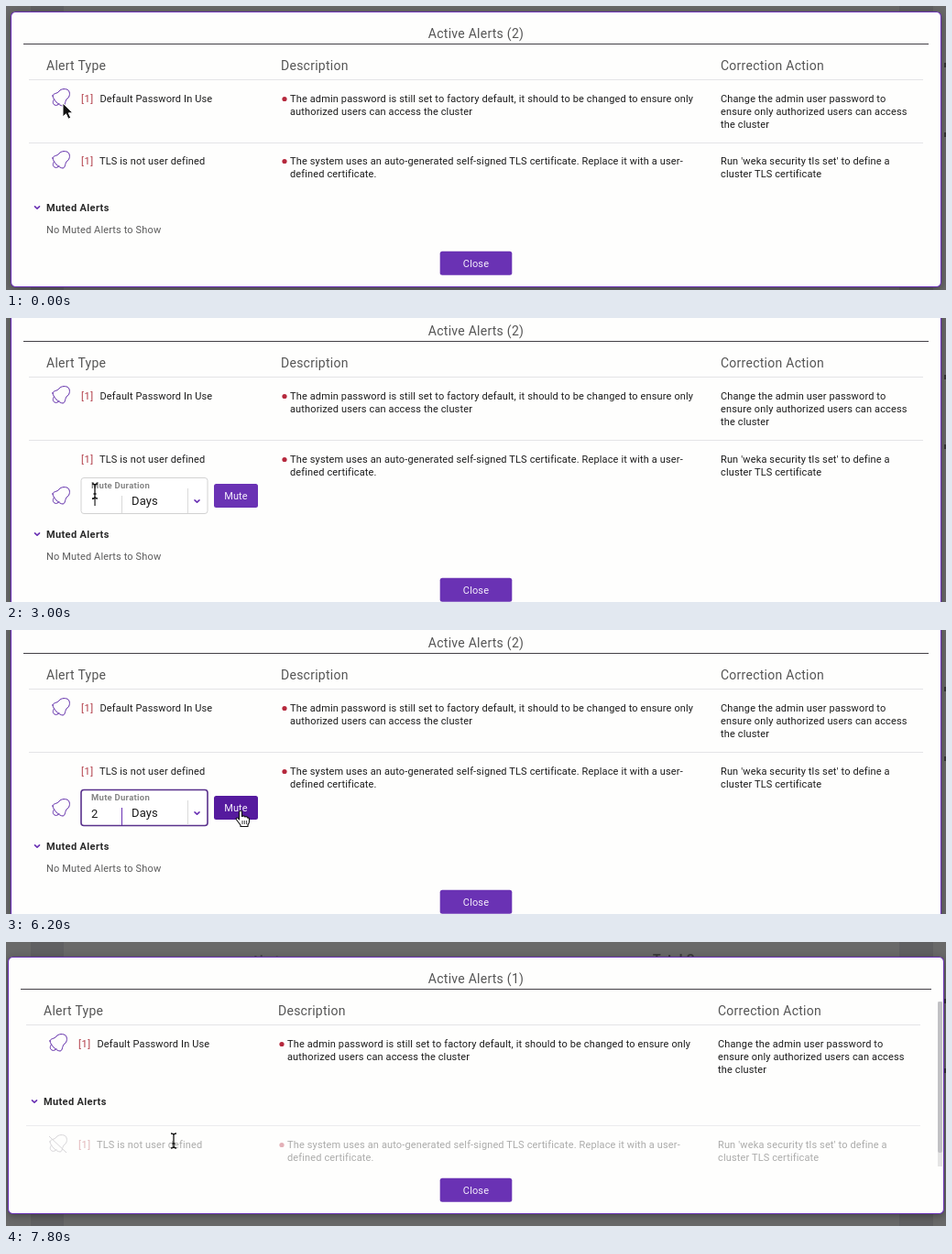
These frames come from a looping animation (1026x310 px, 8 s). An HTML page:

```html
<!DOCTYPE html>
<html lang="en">
<head>
<meta charset="utf-8">
<title>Active Alerts</title>
<style>
html, body { margin: 0; width: 100%; height: 100%; overflow: hidden; background: #696969; }
svg { display: block; width: 1026px; height: 310px; }
text { font: 11px Roboto, "Noto Sans", sans-serif; letter-spacing: .135px; fill: #1c1c1c; white-space: pre; }
.big { font-size: 14px; letter-spacing: .26px; fill: #555; }
.mid { text-anchor: middle; }
.bold { font-weight: 600; letter-spacing: .36px; fill: #2a2a2a; }
.soft { fill: #5c5c5c; }
.red { fill: #b03a46; letter-spacing: .6px; }
.white { fill: #f5effc; }
.label { font-size: 9.5px; font-weight: 600; letter-spacing: .25px; fill: #858585; }
.value { font-size: 13px; letter-spacing: .15px; }
.purple { fill: #6a32b4; }
.sep { fill: #e4e4e7; }
.line { fill: none; stroke: #6a32b4; stroke-linecap: round; stroke-linejoin: round; }
.dot { fill: #b5283c; }

/* One step is 200 ms, or 2.5% of the loop. */
svg * { animation: 8s step-end infinite; }

.panel { animation-name: panel; }
@keyframes panel {
  0%, 92.5% { x: 5.5px; width: 1015px; y: 6.5px; height: 300px; }
  25% { x: 5.5px; width: 1015px; y: 1.5px; height: 310px; }
  27.5% { x: 5.5px; width: 1015px; y: -9.5px; height: 332px; }
  90% { x: 5.5px; width: 1015px; y: -1.5px; height: 315px; }
  95% { x: 2.5px; width: 1021px; y: 16.5px; height: 280px; }
}
.rule { animation-name: rule; }
@keyframes rule {
  0%, 27.5%, 92.5% { x: 19px; width: 988px; fill: #434046; }
  25%, 90% { x: 19px; width: 988px; fill: #6a32b4; }
  95% { x: 16px; width: 994px; fill: #434046; }
}
.up { animation-name: up; }
@keyframes up {
  0%, 92.5% { transform: none; }
  25% { transform: translateY(-5px); }
  27.5% { transform: translateY(-16px); }
  90% { transform: translateY(-7px); }
  95% { transform: translateY(10px); }
}
.row { animation-name: row; }
@keyframes row {
  0%, 92.5% { transform: none; }
  25% { transform: translateY(-4px); }
  27.5% { transform: translateY(-15px); }
  90% { transform: translateY(-6px); }
}
.bell { animation-name: bell; }
@keyframes bell {
  0%, 92.5% { transform: none; }
  25% { transform: translateY(-3px); }
  27.5% { transform: translateY(26px); }
  90% { transform: translateY(-4px); }
}
.down { animation-name: down; }
@keyframes down {
  0%, 92.5% { transform: none; }
  25% { transform: translateY(4.5px); }
  27.5% { transform: translateY(16px); }
  90% { transform: translateY(7px); }
  95% { transform: translateY(-10px); }
}
.left { animation-name: left; }
@keyframes left { 0% { transform: none; } 95% { transform: translateX(-3px); } }
.heading { animation-name: heading; }
@keyframes heading { 0% { transform: none; } 95% { transform: translate(-3px, -36px); } }

.active { animation-name: active; }
@keyframes active { 0% { visibility: visible; } 95% { visibility: hidden; } }
.muted { animation-name: muted; }
@keyframes muted { 0% { visibility: hidden; } 95% { visibility: visible; } }
.hover { animation-name: hover; }
@keyframes hover { 0%, 27.5% { visibility: hidden; } 12.5% { visibility: visible; } }
.tip { animation-name: tip; }
@keyframes tip { 0%, 27.5% { visibility: hidden; } 15% { visibility: visible; } }
.form { animation-name: form; }
@keyframes form { 0%, 90% { visibility: hidden; } 27.5% { visibility: visible; } }
.before { animation-name: before; }
@keyframes before { 0%, 57.5% { visibility: hidden; } 27.5% { visibility: visible; } }
.after { animation-name: after; }
@keyframes after { 0%, 90% { visibility: hidden; } 57.5% { visibility: visible; } }
.caret { animation-name: caret; }
@keyframes caret {
  0%, 47.5%, 72.5% { visibility: hidden; }
  42.5%, 52.5% { visibility: visible; }
}
.field { animation-name: field; }
@keyframes field {
  0% { stroke: #d2d2d2; stroke-width: 1px; }
  42.5% { stroke: #59318c; stroke-width: 1.6px; }
}
.split { animation-name: split; }
@keyframes split { 0% { fill: #d8d8d8; } 42.5% { fill: #6a32b4; } }
.mute { animation-name: mute; }
@keyframes mute { 0% { fill: #6a32b4; } 75% { fill: #551a9e; } }

.pointer { animation-name: pointer; }
@keyframes pointer {
  0% { transform: translate(62px, 106px); }
  5% { transform: translate(62px, 109px); }
  7.5% { transform: translate(62px, 118px); }
  10% { transform: translate(61px, 136px); }
  12.5% { transform: translate(60px, 156px); }
  15% { transform: translate(60px, 165px); }
  17.5% { transform: translate(60px, 167px); }
  30% { transform: translate(66px, 176px); }
  32.5% { transform: translate(86px, 186px); }
  35% { transform: translate(97px, 189px); }
  72.5% { transform: translate(165px, 193px); }
  75% { transform: translate(242px, 194px); }
  77.5% { transform: translate(256px, 195px); }
  92.5% { transform: translate(252px, 198px); }
  95% { transform: translate(212px, 209px); }
  97.5% { transform: translate(183px, 217px); }
}
.arrow { animation-name: arrow; }
@keyframes arrow {
  0%, 30%, 72.5%, 90% { visibility: visible; }
  12.5%, 32.5%, 75%, 97.5% { visibility: hidden; }
}
.hand { animation-name: hand; }
@keyframes hand {
  0%, 30%, 90% { visibility: hidden; }
  12.5%, 75% { visibility: visible; }
}
.beam { animation-name: beam; }
@keyframes beam {
  0%, 55%, 72.5% { visibility: hidden; }
  32.5%, 70%, 97.5% { visibility: visible; }
}
</style>
</head>
<body>
<svg viewBox="0 0 1026 310">
  <defs>
    <g id="bell" fill="none" stroke-linecap="round" stroke-linejoin="round">
      <path d="M-9-2C-9-5-4-4-2-7C0-10 6-10 8-8C10-6 10-1 7 1C4 3 5 9 2 9C-2 9-9 2-9-2Z"/>
      <path d="M-7.500 2C-9.500 4-9 7-7 8C-5 9-3 8-2 6.500"/>
    </g>
    <g id="tls">
      <text class="red" x="82" y="173">[1]</text>
      <text x="102" y="173">TLS is not user defined</text>
      <circle class="dot" cx="304" cy="169.5" r="2.6"/>
      <text x="310" y="173">The system uses an auto-generated self-signed TLS certificate. Replace it with a user-</text>
      <text x="310" y="187">defined certificate.</text>
      <text x="780" y="173">Run 'weka security tls set' to define a</text>
      <text x="780" y="187">cluster TLS certificate</text>
    </g>
    <path id="chevron" class="line" stroke-width="1.6" d="M-2.5-1.2L0 1.2L2.5-1.2"/>
  </defs>

  <!-- Dimmed page behind the dialog -->
  <rect width="1026" height="310" fill="#696969"/>
  <path fill="#606062" d="M27 0h36v310h-36zM975 0h37v310h-37z"/>
  <text class="bold" x="268" y="24" style="font-size:13px;fill:#484848">Alerts</text>
  <text class="bold" x="706" y="24" style="font-size:14px;fill:#3c3c3c">Total S</text>
  <path fill="#333" d="M1024 62h2v5h-2zM1024 138h2v5h-2z"/>

  <rect class="panel" rx="5" fill="#fefefd" stroke="#6a32b4" stroke-width="1.1" style="filter:drop-shadow(0 2px 4px #0005)"/>

  <g class="up">
    <text class="big mid active" x="513" y="35">Active Alerts (2)</text>
    <text class="big mid muted" x="513" y="35">Active Alerts (1)</text>
    <rect class="rule" y="41" height="1"/>
    <g class="left">
      <text class="big" x="44" y="70">Alert Type</text>
      <text class="big" x="300" y="70">Description</text>
      <text class="big" x="780" y="70">Correction Action</text>
      <rect class="sep" x="25" y="80" width="976" height="1"/>
      <use href="#bell" x="60" y="100" stroke="#5f2ba8"/>
      <text class="red" x="82" y="105">[1]</text>
      <text x="102.500" y="105">Default Password In Use</text>
      <circle class="dot" cx="304" cy="101.5" r="2.6"/>
      <text x="310" y="105">The admin password is still set to factory default, it should to be changed to ensure only</text>
      <text x="310" y="119">authorized users can access the cluster</text>
      <text x="780" y="105">Change the admin user password to</text>
      <text x="780" y="119">ensure only authorized users can access</text>
      <text x="780" y="133">the cluster</text>
      <rect class="sep active" x="25" y="149" width="976" height="1"/>
    </g>
  </g>

  <g class="active">
    <g class="row"><use href="#tls"/></g>
    <g class="bell">
      <circle class="hover" cx="60" cy="168" r="15.5" fill="#dcdcdf"/>
      <use href="#bell" x="60" y="168" stroke="#5f2ba8"/>
      <g class="tip">
        <path d="M36 116h47q3 0 3 3v23q0 3-3 3h-18l-5.500 6l-5.500-6h-18q-3 0-3-3v-23q0-3 3-3z" fill="#f1f8fc" stroke="#d3dee5" style="filter:drop-shadow(0 1px 1px #0002)"/>
        <text class="mid" x="59.500" y="134">Mute</text>
      </g>
    </g>
  </g>

  <g class="form">
    <rect class="field" x="82" y="174.500" width="138" height="39" rx="3" fill="#fff"/>
    <text class="label" x="93" y="186">Mute Duration</text>
    <text class="value before" x="93" y="205">1</text>
    <text class="value after" x="93" y="205">2</text>
    <rect class="caret" x="100.500" y="193" width="1" height="14" fill="#222"/>
    <rect class="split" x="126" y="194" width="1" height="19"/>
    <text class="value" x="137" y="204">Days</text>
    <rect x="198" y="186" width="1" height="27" fill="#dadada"/>
    <use href="#chevron" x="208.500" y="200"/>
    <rect class="mute" x="227" y="181" width="48" height="26" rx="2.500"/>
    <text class="white mid" x="251" y="198">Mute</text>
  </g>

  <g class="down">
    <g class="heading">
      <use href="#chevron" x="34" y="220"/>
      <text class="bold" x="44" y="224">Muted Alerts</text>
    </g>
    <text class="soft active" x="44" y="248">No Muted Alerts to Show</text>
    <rect class="purple" x="473.700" y="267.700" width="78.600" height="26" rx="2.500"/>
    <text class="white mid" x="513" y="285">Close</text>
  </g>

  <g class="muted">
    <rect class="sep" x="22" y="200" width="976" height="1" opacity=".7"/>
    <g opacity=".36" transform="translate(-3 52)">
      <use href="#tls"/>
      <g stroke="#77717f" opacity=".8">
        <use href="#bell" x="60" y="168"/>
        <path d="M50 160L69 178"/>
      </g>
    </g>
    <rect x="1017" y="65" width="5" height="180" fill="#e4e4e4"/>
    <rect x="1017" y="65" width="5" height="165" rx="2" fill="#c1c1c4"/>
  </g>

  <g class="pointer">
    <path class="arrow" d="M0 0V15L3.500 11.800L6 17.300L8.700 16.100L6.300 10.800H11Z" fill="#111" stroke="#fff" stroke-width="1"/>
    <g class="hand" fill="#fff" stroke="#111" stroke-width="1.100" stroke-linejoin="round">
      <path d="M-1.500 10V4Q-1.500 2.200 0 2.200T1.500 4V8.500Q3.800 7 4.700 9Q7 8 7.600 10Q9.500 9.500 9.500 12V14Q9.500 16 8 17.500V19.500H0V18L-4.500 12Q-5.500 10-3.500 10Q-2.500 10-1.500 12Z"/>
      <path fill="none" d="M2 13v4M4.300 13v4M6.600 13v4" stroke-width=".8"/>
    </g>
    <path class="beam" d="M-3-8Q0-8 0-6Q0-8 3-8M0-6V6M-3 8Q0 8 0 6Q0 8 3 8M-1.500 3H1.500" fill="none" stroke="#111" stroke-width="1.300"/>
  </g>
</svg>
</body>
</html>
```
